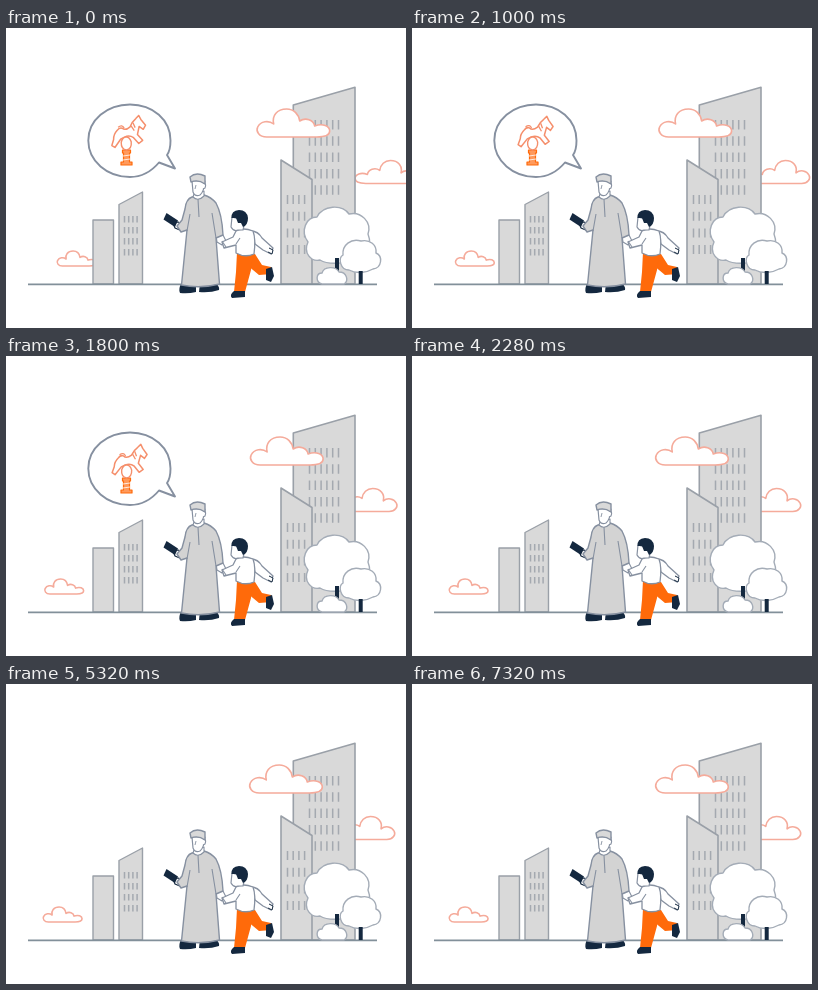
These frames come from a looping animation (400x300 px, 8000 ms). An HTML page with a canvas:

```html
<!DOCTYPE html>
<html lang="en">
<head>
<meta charset="utf-8">
<title>City walk</title>
<style>
  html, body { margin: 0; width: 100%; height: 100%; overflow: hidden; background: #fff; }
  canvas { display: block; width: 400px; height: 300px; }
</style>
</head>
<body>
<canvas id="stage"></canvas>
<script>
const LOOP = 8000, DRIFT_END = 2280;
const GREY = '#d9d9d9', LINE = '#9aa0a8', SLATE = '#8690a0', NAVY = '#14283f';
const ORANGE = '#ff6a0a', SALMON = '#f5ab9b', TREE = '#a4acb7', WHITE = '#fff';

const canvas = document.getElementById('stage');
const ctx = canvas.getContext('2d');
const ratio = window.devicePixelRatio || 1;
canvas.width = 400 * ratio;
canvas.height = 300 * ratio;

const clamp = v => Math.max(0, Math.min(1, v));
const mix = (a, b, k) => a + (b - a) * k;

function shape(d, fill, stroke, width = 1.4) {
  const path = new Path2D(d);
  if (fill) {
    ctx.fillStyle = fill;
    ctx.fill(path);
  }
  if (stroke) {
    ctx.strokeStyle = stroke;
    ctx.lineWidth = width;
    ctx.stroke(path);
  }
}

function windows(x, y, cols, rows, dx, dy, h) {
  let d = '';
  for (let r = 0; r < rows; r++)
    for (let c = 0; c < cols; c++) d += `M${x + c * dx} ${y + r * dy}v${h}`;
  shape(d, null, '#a4a9b0', 1.5);
}

const CLOUD = 'M10 28C2 28 -1 22 1 18C4 12 12 11 17 15C15 7 20 0 30 0' +
  'C37 0 42 5 43 12C49 8 57 11 58 17C66 14 73 17 73 22C73 27 66 28 60 28Z';

// A negative scale mirrors the cloud and anchors its right edge.
function cloud(x, y, scale) {
  const size = Math.abs(scale);
  ctx.save();
  ctx.translate(x, y);
  ctx.scale(scale, size);
  shape(CLOUD, WHITE, SALMON, 1.6 / size);
  ctx.restore();
}

function towers() {
  shape('M87 256V192H107.5V256Z', GREY, LINE);
  shape('M113 256V176.5L136.5 164V256Z', GREY, LINE);
  windows(118.5, 188, 4, 4, 4.2, 11, 6.5);
  shape('M287.3 256V77L349 59.3V256Z', GREY, LINE, 1.6);
  windows(303.5, 92, 6, 5, 5.8, 16.3, 9.5);
}

function frontTower() {
  shape('M275 256V132L306 151.5V256Z', GREY, LINE, 1.6);
  windows(281.5, 167, 4, 4, 5.7, 16.7, 9);
}

function trees() {
  shape('M314 232C305 234 297 225 302 214C294 203 300 189 311 189' +
    'C317 177 336 176 343 186C355 183 366 194 362 206C367 219 359 232 348 231' +
    'C340 236 322 237 314 232Z', WHITE, TREE);
  shape('M331 230V244', null, NAVY, 4);
  shape('M316 256C309 254 310 245 316 245C318 238 330 238 333 244' +
    'C341 244 343 253 338 256Z', WHITE, TREE);
  shape('M343 242C334 242 332 230 337 227C336 217 345 210 355 213' +
    'C364 211 371 217 370 225C377 228 376 240 367 241C360 245 350 246 343 242Z', WHITE, TREE);
  shape('M354.7 243V256', null, NAVY, 4);
}

function man() {
  shape('M176 255L190 255L190 264Q182 266 174 265Q172 260 176 255Z', NAVY);
  shape('M194 255L209 254Q214 259 213 262Q204 265 193 264Z', NAVY);
  // Phone hand
  shape('M167 195L172 194L179 197L176 203L169 200Z', WHITE, NAVY, 1.2);
  shape('M160.5 185L172 192.5L169 199L157.5 191.5Z', NAVY);
  shape('M210 207L217 207L220 213L216 217L211 214Z', WHITE, SLATE, 1.1);
  // Robe and sleeves
  shape('M186 169Q180 171 179 181L176 192L171 198L175 204L181 202L175.5 257' +
    'Q194 261 213.5 256L210 210L217 207Q216 186 210 175Q205 169 198 167Z', '#d3d3d3', SLATE);
  shape('M181 203L184 186M210 210L206 185M192 171L193 189', null, SLATE, 1.1);
  shape('M188 166L187 169Q192 174 198 168L198 163Z', WHITE, SLATE, 1.1);
  // Head and cap
  shape('M186 153L187 164Q189 169 194 167Q198 164 199 153Z', WHITE, SLATE, 1.2);
  shape('M197 155Q201 155 199 160L197 161', WHITE, SLATE, 1.1);
  shape('M185 154L184 149Q190 143.5 199 148L199 156Q192 151 185 154Z', GREY, SLATE);
  shape('M190 157L189 161', null, SLATE, .9);
}

function boy() {
  // Back leg, then standing leg
  shape('M238 226L249 226L256 237L265 239L266 246L253 247L241 237Z', ORANGE);
  shape('M260 241L266 239L268 248L265 254L260 252Z', NAVY);
  shape('M231 224L247 226L245 242L239 264L228 264L230 244Z', ORANGE);
  shape('M228 263L239 263L239 269L226 270Q223 267 228 263Z', NAVY);
  // Shirt and arms
  shape('M245 203Q252 203 256 210L267 220L265 226L257 222L249 216Z', WHITE, SLATE, 1.3);
  shape('M230 203Q237 199 247 203Q250 211 248 226Q239 230 230 225L230 217' +
    'L218 220L216 214L227 209Z', WHITE, SLATE, 1.3);
  shape('M230 216L234 210M216 213L220 219', null, SLATE, 1.1);
  // Head
  shape('M226 189L225 199Q228 204 232 202L237 202L239 193Z', WHITE, SLATE, 1.2);
  shape('M225.5 190Q225 182.5 233 182Q241 182 242 190Q242 197 237 199L235 195' +
    'L232 195L230 190Z', NAVY);
  shape('M263 220L267 222L266 226L262 224', WHITE, NAVY, 1);
}

function horse(t) {
  const pink = '#f58f6c';
  shape('M116.5 122H124.5V125H123.5V134H126V137H115V134H117.5V125H116.5Z', '#ff9a5c', ORANGE, 1.2);
  shape('M117 128L124 127M117 132L124 131', null, WHITE, .8);
  ctx.save();
  ctx.translate(120.5, 121);
  ctx.rotate(-.04 * Math.cos(t * 2 * Math.PI / 2800));
  ctx.translate(-120.5, -121);
  shape('M112 102Q108 106 108 111L106 117L109 119L115 111L119 109Q124 107 128 110' +
    'L133 116L137 113L132 107L134 99L138 102L140.5 98L136 92L134 88L131 91' +
    'Q127 94 125 99Q120 103 117 100Q114 99 112 102Z', WHITE, pink, 1.5);
  shape('M113 99Q117 96 119 100M128 95L130 100M126 98L129 103', null, pink, 1.3);
  shape('M115.5 114Q115 121 120.5 122Q126 121 125.5 114Q124 109 120.5 109Q117 109 115.5 114Z',
    WHITE, pink, 1.4);
  ctx.restore();
}

function bubble(t) {
  const alpha = 1 - clamp((t - 1840) / 400);
  if (!alpha) return;
  ctx.save();
  ctx.globalAlpha = alpha;
  shape('M161 127L169 140.5L153 134.5C145 144 135 149 124 149' +
    'C101 149 82.3 133 82.3 112.5C82.3 92 101 76.5 124 76.5' +
    'C147 76.5 164.5 92 164.5 112.5C164.5 118 164 123 161 127Z', WHITE, SLATE, 1.9);
  horse(t);
  ctx.restore();
}

function draw(t) {
  const k = 1 - Math.pow(1 - clamp(t / DRIFT_END), 1.4);
  ctx.setTransform(ratio, 0, 0, ratio, 0, 0);
  ctx.fillStyle = WHITE;
  ctx.fillRect(0, 0, 400, 300);
  ctx.lineJoin = 'round';
  cloud(mix(409, 389, k), 132.5, -.82);
  cloud(mix(51, 37, k), 223, .535);
  towers();
  cloud(mix(250.7, 243.3, k), 81, 1);
  frontTower();
  shape('M22 256.3H371', null, '#82909a', 1.7);
  trees();
  man();
  boy();
  bubble(t);
}

const start = performance.now();
function tick() {
  draw((performance.now() - start) % LOOP);
  requestAnimationFrame(tick);
}
tick();
</script>
</body>
</html>
```
